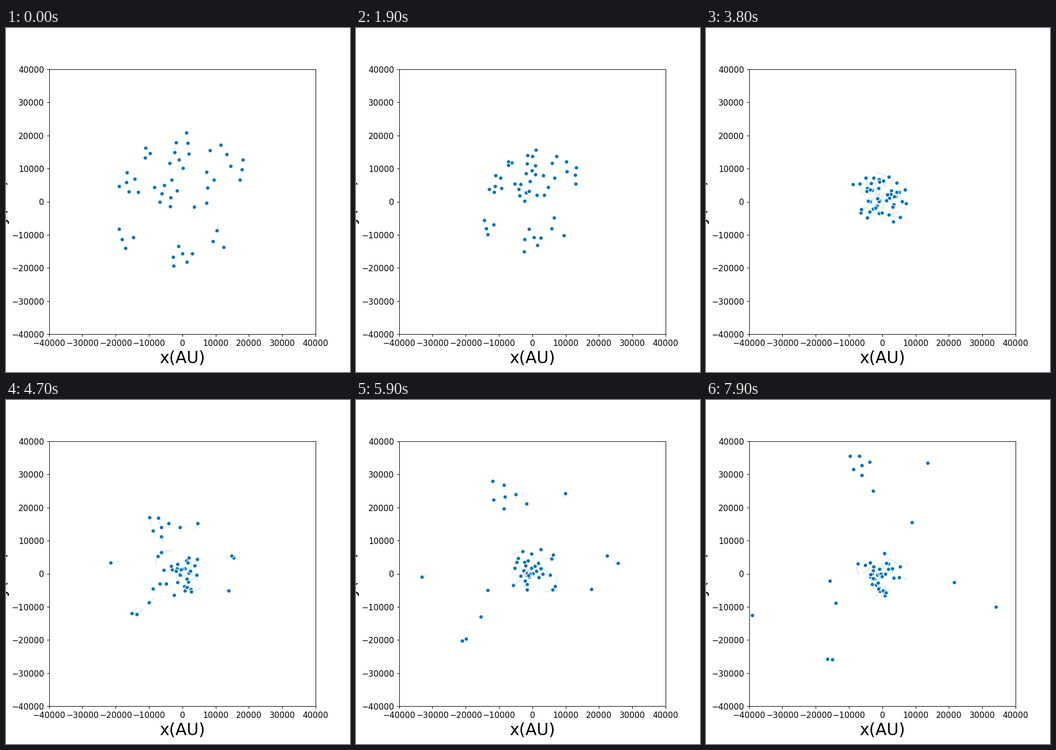
A matplotlib script that plays this animation: 700x700 px, repeating every 8 s.

```python
import numpy as np
import matplotlib.pyplot as plt
from matplotlib.animation import FuncAnimation
from matplotlib.collections import LineCollection

FRAMES, INTERVAL = 80, 100
T_DENSE, T_OUT, T_END = 2.9, 4.7, 7.9     # seconds: collapse, ejection, end
BLUE, HALO, TRAIL = "#0072bd", "#e4f3fb", "#dceffa"
GOLDEN = np.pi * (3 - np.sqrt(5))
rng = np.random.default_rng(11)

# Clumps of the initial cloud: stars, radius, x, y (in 1000 AU).
CLUMPS = [(6, 4, -.7, -16.5), (3, 3.6, 10.6, -12), (4, 3.8, -17, -10.5),
          (4, 3.8, 16.5, 9.5), (3, 3.4, 10.7, 16), (3, 2, -10.5, 15),
          (4, 4, .4, 17.2), (4, 3.3, -1.8, 11.8), (3, 3.2, 8.3, 7),
          (2, 3, 4.6, -.5), (6, 4, -16, 5), (8, 4.6, -5, 2.5)]

# Ejected stars: number, radius, position at T_OUT, position at T_END.
EJECTED = [(6, 4, (-7.1, 14.9), (-6.9, 33.5)),
           (1, 0, (-.7, 14), (-2.7, 25)),
           (1, 0, (2.5, -4.7), (8.9, 15.5)),
           (1, 0, (-8.8, -4.5), (-15.8, -2.2)),
           (1, 0, (4.6, 15.2), (13.6, 33.5)),
           (1, 0, (15.4, 4.8), (34.1, -10)),
           (1, 0, (14.8, 5.4), (21.5, -2.6)),
           (1, 0, (13.9, -5.1), (5, -1.1)),
           (1, 0, (-21.5, 3.3), (-39.1, -12.5)),
           (2, 1.2, (-14.6, -11.8), (-15.9, -25.5)),
           (1, 0, (-10, -8.7), (-14, -8.8))]


def clump(n, radius, x, y):
    """Spread n points evenly over a disc, turned by a random angle."""
    i = np.arange(n)
    r = radius * np.sqrt((i + .5) / n)
    angle = i * GOLDEN + rng.uniform(0, 2 * np.pi)
    return np.column_stack([x + r * np.cos(angle), y + r * np.sin(angle)])


# Infall: outer stars start later and stop further from the centre.
start = np.vstack([clump(*c) for c in CLUMPS])
focus = np.array([0, 5])
dist = np.linalg.norm(start - focus, axis=1, keepdims=True)
dense = focus + (start - focus) * (.2 + .012 * dist)
dense += rng.normal(0, 1.2, start.shape)
power = .9 + .05 * dist

# Ejected stars keep their place within their group.
offsets = np.vstack([clump(n, r, 0, 0) for n, r, *_ in EJECTED])
counts = [n for n, *_ in EJECTED]
out, end = (offsets + np.repeat([e[k] for e in EJECTED], counts, axis=0)
            for k in (2, 3))
n_out = len(offsets)
v_out = (out - dense[:n_out]) / (T_OUT - T_DENSE)
bend = ((end - out) / (T_END - T_OUT) - v_out) / (T_END - T_DENSE)

# Bound stars swing about the drifting centre, keeping their infall speed.
core = slice(n_out, None)
n_core = len(start) - n_out
omega = rng.uniform(1.8, 3, (n_core, 1))
speed = (power * (dense - start))[core] / T_DENSE
swing = speed / omega + rng.normal(0, 3.6, (n_core, 2))


def centre(tau):
    return np.array([-.3, -.5 + 4.5 * np.exp(-.6 * tau)])


def positions(t):
    t = max(t, 0)
    if t <= T_DENSE:
        return 1000 * (start + (dense - start) * (t / T_DENSE) ** power)
    tau = t - T_DENSE
    ejected = dense[:n_out] + v_out * tau + bend * tau * (t - T_OUT)
    bound = (centre(tau) + (dense[core] - centre(0)) * np.cos(omega * tau)
             + swing * np.sin(omega * tau))
    return 1000 * np.vstack([ejected, bound])


fig, ax = plt.subplots(figsize=(7, 7), dpi=100)
ax.set(xlim=(-40000, 40000), ylim=(-40000, 40000))
ax.tick_params(labelsize=12)
ax.set_xlabel("x(AU)", fontsize=24)
ax.set_ylabel("y(AU)", fontsize=24)

halo = ax.scatter(*positions(0).T, s=68, color=HALO, linewidths=0, zorder=1)
trails = LineCollection([], colors=TRAIL, linewidths=2, zorder=2)
ax.add_collection(trails, autolim=False)
stars = ax.scatter(*positions(0).T, s=36, color=BLUE, edgecolors="white",
                   linewidths=1, zorder=3)


def update(frame):
    t = frame * INTERVAL / 1000
    history = np.stack([positions(t - lag) for lag in (.2, .1, 0)], axis=1)
    halo.set_offsets(history[:, -1])
    stars.set_offsets(history[:, -1])
    trails.set_segments(list(history))
    return halo, trails, stars


anim = FuncAnimation(fig, update, frames=FRAMES, interval=INTERVAL,
                     repeat=True, repeat_delay=0)
plt.show()
```
